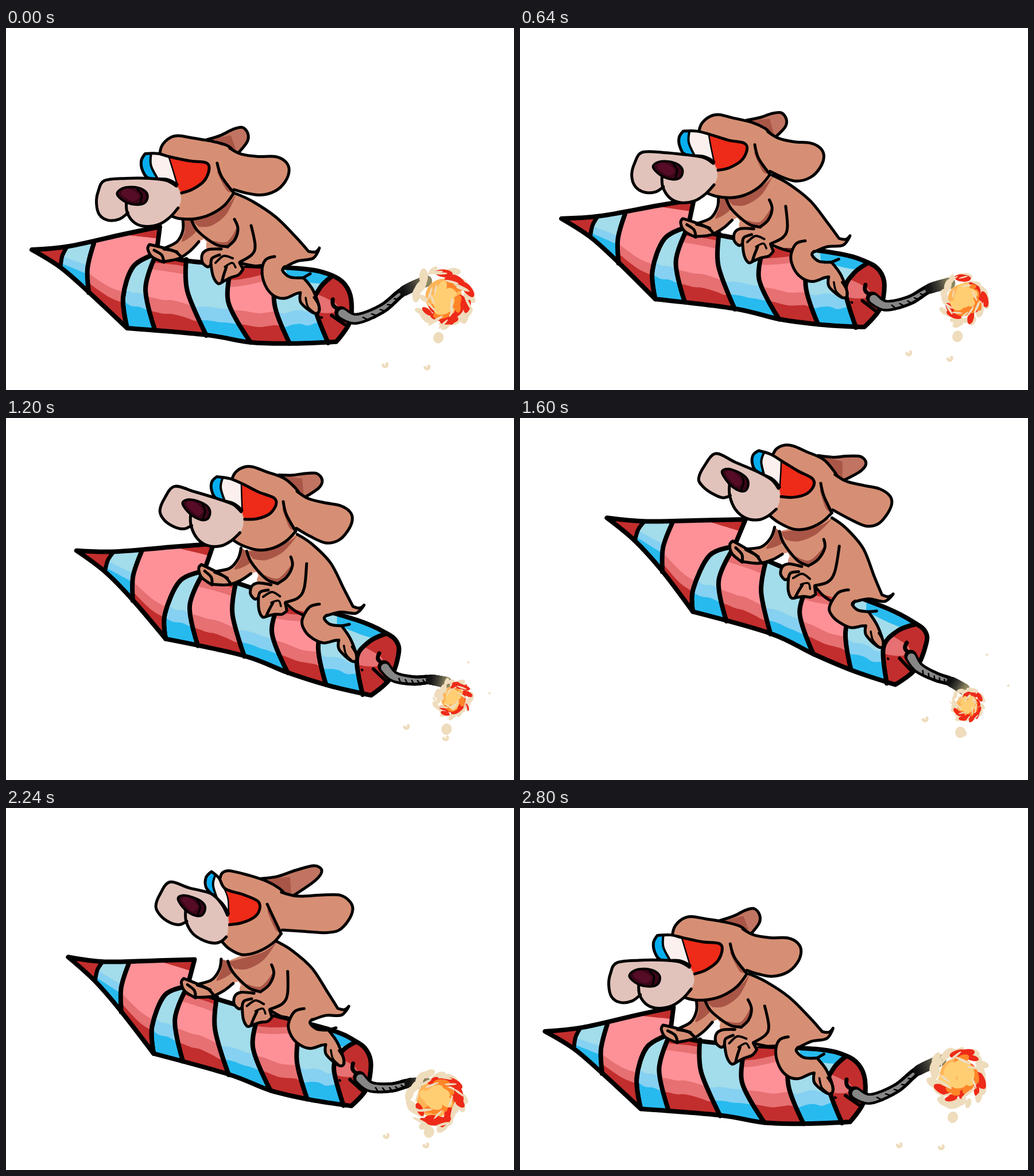
Write an HTML page with a canvas that moves like this. It is 885x632 px and loops after 2880 ms.

```html
<!DOCTYPE html>
<html lang="en">
<head>
<meta charset="utf-8">
<title>Rocket dog</title>
<style>
html, body { margin: 0; width: 100%; height: 100%; overflow: hidden; background: #fff; }
canvas { display: block; width: 885px; height: 632px; }
</style>
</head>
<body>
<canvas id="stage" width="885" height="632"></canvas>
<script>
const ctx = document.getElementById('stage').getContext('2d');
const LOOP = 2880, STEP = 80, PEAK = 1920, DIP = 2600;

const mix = (a, b, k) => a + (b - a) * k;
const parse = s => s.split(' ').map(p => p.split(',').map(parseFloat));
const sway = u => (1 - Math.cos(Math.PI * u)) / 2;

// 0 = level, 1 = nose up: slow climb, quick fall past level, soft return
function climb(time) {
  const t = (time + LOOP) % LOOP;
  if (t < PEAK) return sway(t / PEAK);
  if (t < DIP) return mix(1, -.1, sway((t - PEAK) / (DIP - PEAK)));
  return -.1 * ((LOOP - t) / (LOOP - DIP)) ** 2;
}

// Handles at level and at the peak; lag (ms) lets loose parts trail behind
const parts = {
  rocket: {
    level: '45,387 268,347 210,524 575,548 600,470 567,436 349,535 316,408 426,547 143,460 258,519 204,470 258,397 152,376 537,485',
    peak: '160,157 401,166 306,325 657,462 713,384 693,359 442,366 438,241 516,403 255,252 367,337 308,288 375,216 272,170 637,398',
    lag: x => mix(20, -70, (x - 45) / 530)
  },
  body: {
    level: '250,380 372,445 546,384 537,498 518,436 446,425 485,472 400,288 527,391 323,335 308,337 336,373 427,345',
    peak: '378,206 482,305 657,302 630,393 612,331 544,326 583,359 553,166 637,305 458,190 454,182 465,229 565,215',
    lag: () => -15
  },
  head: {
    level: '172,266 158,300 178,335 195,290 247,293 245,346 250,262 302,295 243,219 287,227 353,242 308,288 300,188 330,333 397,289 355,194 395,208 369,238 423,185 494,245 438,291 460,224',
    peak: '358,42 325,85 352,113 367,75 410,99 408,159 428,77 461,125 432,42 471,67 525,104 466,130 490,39 487,184 553,157 537,56 563,92 534,108 623,70 664,137 612,176 632,110',
    lag: x => x < 251 ? 45 : x > 400 ? 60 : 5
  },
  // offsets from the fuse root: five fuse points, flame, two crescents, blob
  trail: {
    level: '0,0 27,11 72,-7 109,-37 149,-55 179,-27 77,93 150,97 170,44',
    peak: '0,0 13,21 41,39 67,51 89,67 92,94 21,113 87,140 80,140',
    lag: () => 15
  }
};
for (const p of Object.values(parts)) {
  p.level = parse(p.level);
  p.peak = parse(p.peak);
}

const pose = ({ level, peak, lag }, t) => level.map((p, i) => {
  const k = climb(t - lag(p[0]));
  return p.map((v, c) => mix(v, peak[i][c], k));
});

// Moving least squares: carries a rest point along with the nearby handles
function makeWarp(from, to) {
  return (x, y) => {
    let sum = 0, px = 0, py = 0, qx = 0, qy = 0;
    const weights = from.map(([a, b], i) => {
      const w = 1 / ((a - x) ** 2 + (b - y) ** 2 + 80);
      sum += w; px += w * a; py += w * b;
      qx += w * to[i][0]; qy += w * to[i][1];
      return w;
    });
    px /= sum; py /= sum; qx /= sum; qy /= sum;
    let a = 0, b = 0, d = 0, e = 0, f = 0, g = 0, h = 0;
    from.forEach((p, i) => {
      const w = weights[i], dx = p[0] - px, dy = p[1] - py;
      const ex = to[i][0] - qx, ey = to[i][1] - qy;
      a += w * dx * dx; b += w * dx * dy; d += w * dy * dy;
      e += w * dx * ex; f += w * dy * ex; g += w * dx * ey; h += w * dy * ey;
    });
    const det = a * d - b * b;
    const u = (d * (x - px) - b * (y - py)) / det;
    const v = (a * (y - py) - b * (x - px)) / det;
    return [qx + u * e + v * f, qy + u * g + v * h];
  };
}

// Smooth curve through points; "!" marks a corner, a final "z" closes it
function trace(warp, text) {
  const closed = text.endsWith('z');
  const marks = text.match(/[\d.]+,[\d.]+!?/g);
  const pts = marks.map(m => warp(...m.split(',').map(parseFloat)));
  const n = pts.length;
  const wrap = i => closed ? (i + n) % n : Math.max(0, Math.min(n - 1, i));
  const bend = i => [0, 1].map(c => marks[wrap(i)].endsWith('!') ? 0
    : (pts[wrap(i + 1)][c] - pts[wrap(i - 1)][c]) / 6);
  const path = new Path2D();
  path.moveTo(...pts[0]);
  for (let i = 0; i < (closed ? n : n - 1); i++) {
    const a = pts[i], b = pts[wrap(i + 1)], s = bend(i), e = bend(i + 1);
    path.bezierCurveTo(a[0] + s[0], a[1] + s[1], b[0] - e[0], b[1] - e[1], b[0], b[1]);
  }
  if (closed) path.closePath();
  return path;
}

function pen(warp) {
  const fill = (text, color) => { ctx.fillStyle = color; ctx.fill(trace(warp, text)); };
  const line = (text, width = 5) => {
    ctx.lineWidth = width;
    ctx.stroke(trace(warp, text));
  };
  const inside = (text, paint) => {
    ctx.save();
    ctx.clip(trace(warp, text));
    paint();
    ctx.restore();
  };
  return { fill, line, inside };
}

function random(seed) {
  return (a, b) => {
    seed = seed * 16807 % 2147483647;
    return mix(a, b, seed / 2147483647);
  };
}

const RED = ['#fd9197', '#e67072', '#c22e2d'], BLUE = ['#a3dcea', '#86d1f2', '#27baef'];
const FUR = '#d68f74', SHADE = '#a95647', CREAM = '#eedcbc';

const rings = [
  '262,394! 222,416 204,470 211,524!',
  '262,394! 243,455 259,526!',
  '314,404! 316,460 349,537!',
  '394,412! 387,478 426,549!',
  '468,412! 468,485 494,551!',
  '567,434! 546,455 537,485 561,550!',
  '620,425! 620,555!'
];
const reversed = s => s.split(' ').reverse().join(' ');
const tube = rings[0] + ' 349,536 426,549 500,551 575,548! 598,515 601,475 590,448 567,432 520,421 400,414 312,406z';
const cone = '45,387! 110,381 205,360 268,347! ' + rings[0] + ' 143,460 95,418z';

// Everything below a rippled line that follows the belly of the tube
function shadow(lift) {
  const rand = random(99);
  let edge = '';
  for (let x = 190; x <= 620; x += 14) {
    const y = 520 - 42 * ((x - 470) / 270) ** 2 - lift + rand(-3, 3);
    edge += `${x},${y.toFixed(1)} `;
  }
  return edge + '620,600! 190,600!z';
}

function drawRocket({ fill, line, inside }) {
  inside(tube, () => {
    for (let i = 0; i < 6; i++) {
      const tone = i % 2 ? RED : BLUE;
      inside(rings[i] + ' ' + reversed(rings[i + 1]) + 'z', () => {
        fill(shadow(200), tone[0]);
        fill(shadow(24), tone[1]);
        fill(shadow(0), tone[2]);
        if (i === 5) {
          fill(shadow(200), RED[2]);
          fill('535,462! 575,482 570,497 536,493z', RED[1]);
        } else if (i % 2) {
          fill('240,380! 240,420! 310,430 390,452 470,436! 470,380!z', RED[1]);
          fill('240,380! 240,409! 310,416 390,440 470,424! 470,380!z', RED[2]);
        }
      });
    }
    fill('485,410! 580,420! 552,446 490,436!z', BLUE[2]);
  });
  rings.slice(1, 6).forEach(r => line(r, 8));
  line(tube, 8);

  inside(cone, () => {
    fill(cone, RED[0]);
    fill('130,418! 180,452 220,464! 220,530! 130,530!z', RED[1]);
    fill('130,434! 180,470 220,484! 220,530! 130,530!z', RED[2]);
    fill('215,362! 270,368! 272,340!z', RED[2]);
    fill('40,380! 105,375! 95,418!z', RED[2]);
    inside('105,375! 95,418! 145,466! 141,435 153,372!z', () => {
      fill('90,370! 160,370! 160,470! 90,470!z', BLUE[0]);
      fill('90,396! 150,417! 150,470! 90,470!z', BLUE[1]);
      fill('90,408! 150,433! 150,470! 90,470!z', BLUE[2]);
    });
  });
  line('105,384! 98,398 95,416', 7);
  line('153,376! 142,420 144,462', 8);
  line(cone, 8);

  line('569,474! 571,486 592,499', 7);
  line('567,502! 590,518', 6);
  line('549,505! 550,506', 4);
}

function drawBody({ fill, line }) {
  // far arm
  const arm = '308,335! 308,354 298,373 277,384';
  const wrist = '336,373 322,388 302,402 275,408';
  fill(arm + ' 250,378! 247,386 255,400 275,408! ' + reversed(wrist) + '! 360,360! 323,335!z', FUR);
  fill('309,335! 312,352 307,373 332,354 323,335!z', SHADE);
  line(arm);
  line(wrist);
  line('298,391 275,384 250,378! 247,386 255,400 275,409! 271,396 258,388');
  line('275,386 294,390 306,400');

  // torso and tail
  const back = '400,289! 430,303 470,330 505,365 527,390! 539,391 546,384! 535,402 508,407 485,418';
  fill(back + '! 452,412 412,416! 355,392 350,374! 332,352 323,335!z', FUR);
  fill('324,336! 380,312 402,288! 384,325 358,345 336,347!z', SHADE);
  fill('360,371! 385,373 401,350! 404,362 391,380 370,384!z', SHADE);
  line(back);
  line('323,335! 332,352 350,368 368,379 386,382');
  line('398,334! 404,350 399,369 386,382');
  line('427,345! 434,380 428,396 407,409');
  line('410,411! 430,415 452,418');

  // hind leg
  const leg = '468,399! 452,405 446,425 452,450 466,467 485,472 505,464 513,462! 514,480 537,498 546,490 535,458 518,436! 495,435 482,424 485,417!';
  fill(leg + 'z', FUR);
  line(leg);
  line('518,436! 530,429');
  line('522,471 526,487 537,497', 3.5);
  line('536,470 544,483 545,494', 3.5);

  // near paw
  const paw = '375,386! 352,387 342,395 342,409 351,417 357,413! 361,434 369,446 376,444! 391,436 405,431 413,421! 407,410!';
  fill(paw + 'z', FUR);
  line(paw);
  line('357,413! 359,402 372,396');
  line('376,444! 379,432 384,417');
  line('365,410 379,398 395,402', 4);
  line('381,417! 394,410 400,418', 3.5);
}

function drawHead({ fill, line }) {
  const backEar = '350,195! 375,187 395,177 412,173 422,183 421,198 404,219!';
  fill(backEar + ' 388,207!z', '#c07461');
  fill('352,196! 392,187! 403,218! 388,207!z', SHADE);
  line(backEar);

  const skull = '268,221! 272,205 285,192 300,188 325,192 360,198 385,205 396,214!';
  const chin = '397,288! 380,310 355,326 330,333 305,333 288,328!';
  fill(skull + ' ' + chin + ' 250,262!z', FUR);
  line(skull);
  line(chin);

  const ear = '390,210! 410,220 440,224 470,224 488,233 494,248 487,268 470,284 445,291 420,288 397,282';
  fill(ear + '! 380,262 369,238!z', FUR);
  fill('369,238! 378,262 397,285! 385,284 368,252!z', SHADE);
  line(ear);
  line('368,236! 376,260 397,288');

  // glasses
  const rim = '298,273! 280,264 250,262 239,250 236,232 243,219! 265,219 286,225 ';
  const lens = '320,232 348,235 354,246 346,266 326,281 306,288!';
  fill(rim + lens + 'z', '#fbf0ee');
  fill('243,219! 253,220! 253,240 264,263! 247,262 236,232z', '#06aef0');
  fill('284,226! ' + lens + ' 298,273 291,248z', '#ee2a18');
  line('253,220! 253,240 264,262', 4);
  line('284,226! 291,248 298,272', 2.5);
  line(rim + lens);

  // muzzle and nose
  const cheek = '213,322! 198,333 178,335 163,325 158,305 161,285 172,266 210,262 250,262 280,266 297,276';
  const jowl = '300,314 286,330 268,342 245,346 225,340 212,323 210,304!';
  fill(cheek + ' 305,297 ' + jowl + 'z', '#e2c3bb');
  line(cheek);
  line(jowl);
  const nose = '194,290 202,280 220,277 238,281 247,291 243,304 228,308 208,303z';
  fill(nose, '#3b0718');
  fill('201,289 212,280 232,291 222,302z', '#560c26');
  line(nose, 4);
  line('229,281 237,291 234,305', 3);
}

function oval(x, y, a, b, turn, color) {
  ctx.fillStyle = color;
  ctx.beginPath();
  ctx.ellipse(x, y, a, b, turn, 0, 7);
  ctx.fill();
}
const dot = (x, y, r, color) => oval(x, y, r, r, 0, color);

function drawFuse(p) {
  const at = s => {
    const i = Math.min(3, Math.floor(s * 4)), u = s * 4 - i;
    const q = k => p[Math.max(0, Math.min(4, k))];
    return [0, 1].map(c => {
      const a = q(i - 1)[c], b = q(i)[c], d = q(i + 1)[c], e = q(i + 2)[c];
      return b + u / 2 * (d - a + u * (2 * a - 5 * b + 4 * d - e + u * (3 * (b - d) + e - a)));
    });
  };
  const sweep = (from, to, r0, r1, color) => {
    for (let k = 0; k <= 50; k++) dot(...at(mix(from, to, k / 50)), mix(r0, r1, k / 50), color);
  };
  sweep(0, .8, 11, 8, '#000');
  sweep(.04, .7, 7, 2.5, '#878787');
  ctx.lineWidth = 2.5;
  for (let s = .32; s < .7; s += .08) {
    const [x, y] = at(s), [u, v] = at(s + .03), d = Math.hypot(u - x, v - y) / 6;
    ctx.beginPath();
    ctx.moveTo(u + (y - v) / d, v + (u - x) / d);
    ctx.lineTo(x, y);
    ctx.stroke();
  }
  const glow = ctx.createLinearGradient(...p[3], ...p[4]);
  glow.addColorStop(0, '#111');
  glow.addColorStop(.5, '#45423a');
  glow.addColorStop(1, '#8d865f');
  sweep(.76, 1, 9, 10, glow);
}

function drawFire([flame, left, right, blob], t) {
  const rand = random((t / STEP + 1) * 7919);
  const size = mix(54, 31, climb(t + 220));
  // color, count, inner and outer reach, petal length and width, angle range
  const layers = [
    [CREAM, 20, .65, .95, .23, .12, 0, 6.28],
    ['#ee2a18', 13, .5, .86, .27, .12, -1.7, 2.6],
    ['#ff8528', 9, .25, .6, .25, .13, -1.4, 2.2],
    ['#ffce73', 11, .05, .42, .26, .16, 0, 6.28],
    [CREAM, 14, .35, .92, .24, .04, 0, 6.28]
  ];
  dot(...flame, size * .6, '#ffb458');
  for (const [color, count, near, far, len, wide, from, to] of layers) {
    for (let i = 0; i < count; i++) {
      const a = mix(from, to, (i + rand(0, .9)) / count), r = rand(near, far) * size;
      const k = size * rand(.7, 1.25);
      oval(flame[0] + Math.cos(a) * r, flame[1] + Math.sin(a) * r,
        len * k, wide * k, a + rand(.6, 1.8), color);
    }
  }
  oval(...blob, 9, 10, .3, CREAM);
  ctx.save();
  ctx.strokeStyle = CREAM;
  ctx.lineWidth = 5;
  for (const [x, y] of [left, right]) {
    ctx.beginPath();
    ctx.arc(x, y - 2, 3.5, -.5, 2.9);
    ctx.stroke();
  }
  ctx.restore();
  if (climb(t) > .55) {
    dot(left[0] + 108, left[1] - 114, 2, CREAM);
    dot(left[0] + 145, left[1] - 60, 2, CREAM);
  }
}

function draw(t) {
  const [rocket, body, head] = ['rocket', 'body', 'head'].map(
    name => makeWarp(parts[name].level, pose(parts[name], t)));
  const root = rocket(583, 497);
  const trail = pose(parts.trail, t).map(([x, y]) => [root[0] + x, root[1] + y]);
  ctx.fillStyle = '#fff';
  ctx.fillRect(0, 0, 885, 632);
  ctx.strokeStyle = '#000';
  ctx.lineCap = ctx.lineJoin = 'round';
  drawRocket(pen(rocket));
  drawFuse(trail.slice(0, 5));
  drawFire(trail.slice(5), t);
  drawBody(pen(body));
  drawHead(pen(head));
}

const start = performance.now();
let shown = -1;
function tick() {
  const step = Math.floor((performance.now() - start) % LOOP / STEP);
  if (step !== shown) draw((shown = step) * STEP);
  requestAnimationFrame(tick);
}
tick();
</script>
</body>
</html>
```
